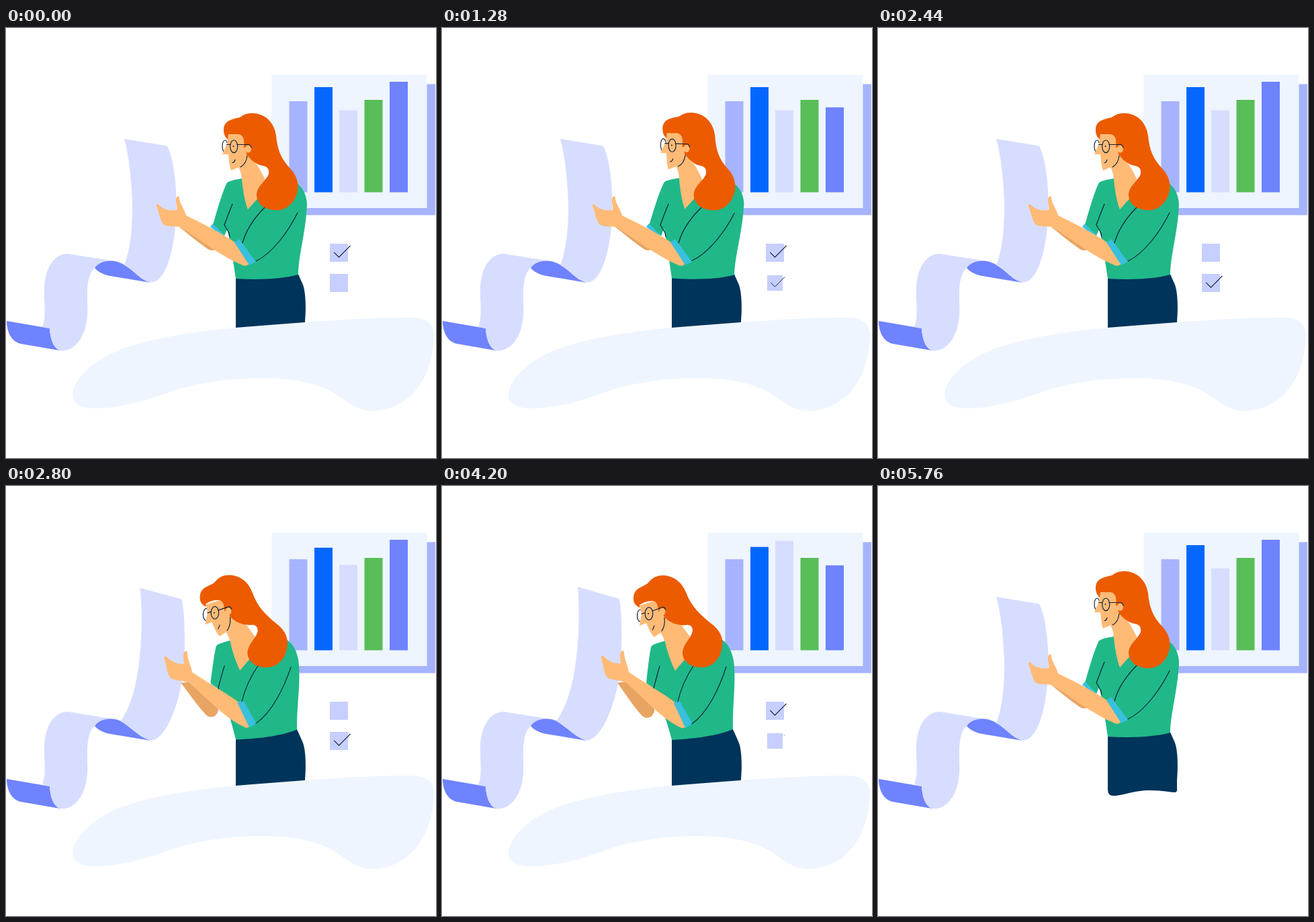
An HTML page for the animation above (5.8 s loop, 640x640 px).

```html
<!DOCTYPE html>
<html lang="en">
<head>
<meta charset="utf-8">
<title>Report review</title>
<style>
  html, body { margin: 0; width: 100%; height: 100%; overflow: hidden; background: #fff; }
  svg { display: block; width: 100%; height: 100%; }
  .line { fill: none; stroke: #0b1f3a; stroke-width: 1.15; stroke-linecap: round; stroke-linejoin: round; }
  .tick { fill: none; stroke: #0b1f3a; stroke-width: 1.1; }
</style>
</head>
<body>
<svg viewBox="0 0 640 640">
  <path fill="#a6b4ff" d="M409 83.5H639V278.5H409Z"/>
  <path fill="#eef5fe" d="M395.5 69.5H626.5V268H395.5Z"/>
  <g id="bars"></g>
  <g id="boxes"></g>
  <path fill="#6f83ff" d="M1 436L65 447C66 465 72 479 83 480.5L22 470C8 467 1 452 1 436Z"/>
  <path fill="#d7ddff" d="M54 445C60 430 57 415 57 395C56 360 70 336 92 336L158 346.5C145 347 137 351 132 357C120 368 121 390 121 410C124 450 108 480 83 480.5C72 479 66 465 65 447Z"/>
  <path fill="#6f83ff" d="M132 357C137 350 146 346.5 155 346.5C180 346 195 372 215 379L155 369C145 367 137 363 132 357Z"/>
  <path fill="#00345b" d="M342 370V452Q342 461 350 461C365 461 380 453 405 453C425 453 435 456 441 456Q446 456 445 450V438C447 415 446 390 441 380L433 362Z"/>
  <g id="person"></g>
  <path id="ground" fill="#eef5fe" d="M99 545C101 520 135 486 200 469C240 458 290 451 342 446C375 443 410 441 445 438C500 434 550 431 600 431C625 430 637 440 637 457C636 510 610 566 548 570C510 570 505 545 460 531C400 513 300 521 240 543C190 562 150 567 128 566C108 565 98 557 99 545Z"/>
</svg>
<script>
const LOOP = 5800, STEP = 40;
const $ = id => document.getElementById(id);

function add(parent, tag, attrs) {
  const el = document.createElementNS('http://www.w3.org/2000/svg', tag);
  for (const k in attrs) el.setAttribute(k, attrs[k]);
  return parent.appendChild(el);
}

const ramp = (t, a, b) => Math.min(1, Math.max(0, (t - a) / (b - a)));
const sine = (t, a, b) => (1 - Math.cos(Math.PI * ramp(t, a, b))) / 2;
const cubic = (t, a, b) => {
  const x = ramp(t, a, b);
  return x < .5 ? 4 * x ** 3 : 1 - 4 * (1 - x) ** 3;
};
// rises over a..b, falls back over c..d
const swing = (t, a, b, c, d) => sine(t, a, b) - sine(t, c, d);
const pulse = (t, a, b) => Math.sin(Math.PI * ramp(t, a, b));

const oval = (x, y, rx, ry) =>
  `M${x + rx} ${y}a${rx} ${ry} 0 1 0 ${-2 * rx} 0a${rx} ${ry} 0 1 0 ${2 * rx} 0Z`;

// Path between an upright and a leaning shape
function mix(a, b, p) {
  const nums = b.match(/-?[\d.]+/g);
  let i = 0;
  return a.replace(/-?[\d.]+/g, n => +(+n + (nums[i++] - n) * p).toFixed(2));
}

const SKIN = '#ffbb76', SHIRT = '#20b888', CUFF = '#39c0dd', HAIR = '#ec5b00';

// [paint, upright, leaning, held]: held parts do not follow the backward sway
const parts = [
  ['#d7ddff',
    'M176 165L240 175.5C252 200 255 250 253 280C250 340 235 380 215 378.5C200 376 190 360 176 353C187 325 188 290 188 265C187 225 183 190 176 165Z',
    'M202 150L264 168C269 200 268 250 264 282C258 325 238 378 215 378.5C200 376 185 358 170 350C188 325 196 290 200 255C204 220 205 185 202 150Z', 1],
  [SHIRT,
    'M351 224C340 226 329 228 328 232C320 250 313 275 308 293L325 309L329 300L333 315C337 340 340 360 342 373C375 375 410 374 435 367C435 340 447 300 448 262C447 245 440 237 434 232L395 227L351 224Z',
    'M333 230C325 233 312 235 311 240C308 255 306 275 304 293L316 302L318 310L333 347C337 360 340 370 342 378C375 376 410 372 433 362C432 330 437 300 435 270C434 250 427 235 417 229L378 230L333 230Z'],
  [CUFF, 'M308 291L304 296L321 309L326 309Z', 'M305 294L306 298L312 303L316 303Z', 1],
  ['#e8a463',
    'M254 293C270 306 285 318 299 328C304 332 311 332 314 327L305 318L280 296Z',
    'M261 293C275 312 285 328 296 340C302 348 313 347 316 335L316 320L280 290Z', 1],
  [SKIN,
    'M268 279C295 292 320 305 341 319L362 350C358 356 353 354 350 352C320 340 290 315 258 296C250 295 238 296 234 292C229 285 228 275 224 265C224 260 227 262 229 265C236 271 245 272 254 271C255 265 252 258 253 254C255 249 258 249 258 254C259 262 266 270 268 279Z',
    'M278 277C300 292 325 306 347 322L363 358C360 361 357 361 354 359C325 345 300 315 272 291C264 290 250 288 246 285C240 278 240 265 237 256C236 251 240 252 242 255C250 262 258 265 266 264C266 260 264 253 266 248C269 243 271 244 271 249C272 260 277 268 278 277Z', 1],
  [CUFF, 'M347 314L340 319L362 353L372 348Z', 'M353 319L345 323L362 360L373 354Z', 1],
  ['line', 'M337 262C332 274 328 285 325 293L332 305L333 311', 'M324 268C321 278 318 290 315 301L315 301L315 301', 1],
  [SKIN,
    'M345 205C349 212 351 220 351 226C353 245 356 260 360 270L387 240L385 224C381 217 378 210 374 204L358 188Z',
    'M324 216C328 222 331 228 332 232C336 250 342 265 347 275L375 242L372 228C366 220 361 213 357 208L332 194Z'],
  ['line', 'M386 266C372 280 358 298 352 320', 'M375 266C364 283 355 302 351 321'],
  ['line', 'M434 275C420 303 397 335 372 347', 'M423 269C413 300 396 337 372 354'],
  ['lens', oval(326, 176, 4, 9), oval(295, 193, 4.5, 9)],
  [SKIN,
    'M331 158L354 158L362 185C358 195 352 205 347 207L335 212C332 205 332 195 331 188L322 188L329 172Z',
    'M294 178L318 170L332 190C333 202 331 212 326 218L316 225C311 220 308 213 304 204L294 208L297 190Z'],
  [HAIR,
    'M330 166C326 162 324 158 324 152C324 138 335 136 348 133C355 128 361 126 370 127C390 129 400 145 402 160C404 182 410 195 422 208C432 218 436 230 434 242C430 262 415 273 400 271C382 270 373 260 373 248C374 234 388 227 391 217C392 209 388 206 382 205C373 204 364 196 358 188L357 178L354 178C356 164 352 158 345 158C340 158 335 158 331 158Z',
    'M294 181C288 178 285 174 285 168C285 152 296 152 306 145C312 137 319 133 329 133C348 134 358 146 363 158C371 180 385 192 401 205C413 214 419 225 417 238C415 258 402 270 386 270C368 270 358 260 358 248C359 234 372 226 373 215C373 208 368 206 363 207C350 208 338 203 331 195L326 186L322 187C322 175 318 171 313 171C306 171 300 173 294 177Z'],
  [SKIN, oval(360.5, 180, 4.5, 5.8), oval(328, 187, 4.5, 5.8)],
  ['line', 'M359 190C358 198 355 204 349 207', 'M331 196C332 204 331 210 327 216'],
  ['line', oval(339.2, 176.3, 5.5, 9.3), oval(308, 190, 5.8, 9.3)],
  ['line', 'M328.5 173.5L334 173.5', 'M297 190.5L302.5 188.5'],
  ['line', 'M344 173.5L361 173.5Q364 174 365 178', 'M313 186L328 180.5Q331 180 333 184'],
  ['#0b1f3a', oval(338.5, 176, 1, 1), oval(307, 190, 1, 1)],
  ['line', 'M337 200.5Q340 200 341 196', 'M313.5 214Q314.5 211 316 208']
].map(([paint, a, b, held]) => {
  const attrs = paint === 'line' ? { class: 'line' }
    : paint === 'lens' ? { class: 'line', style: 'fill:#fff' } : { fill: paint };
  return { el: add($('person'), 'path', attrs), a, b, held };
});

const bars = [
  [421.5, '#a6b4ff'], [459, '#0467fd'], [496, '#d7ddfe'], [533.5, '#59be57'], [571, '#6f83ff']
].map(([x, fill]) => add($('bars'), 'rect', { x, width: 27, fill }));

const boxes = [334.5, 379.5].map(y => {
  const g = add($('boxes'), 'g', {});
  add(g, 'path', { d: 'M-13.5-13.5h27v27h-27Z', fill: '#c7cfff' });
  const tick = add(g, 'path', { class: 'tick', d: 'M-7.2-.6L0 6.6L17-10.5', pathLength: 1 });
  return { g, tick, y };
});

function setBox({ g, tick, y }, shrink, from, to) {
  g.setAttribute('transform', `translate(495.5 ${y}) scale(${1 - .14 * shrink})`);
  tick.setAttribute('visibility', to > from ? 'visible' : 'hidden');
  tick.setAttribute('stroke-dasharray', `0 ${from} ${to - from} 2`);
}

function draw(t) {
  const lean = cubic(t, 2400, 2960) - cubic(t, 4840, 5410);
  const sway = lean - .11 * swing(t, 0, 960, 1260, 1880);
  for (const { el, a, b, held } of parts) el.setAttribute('d', mix(a, b, held ? lean : sway));

  const tops = [
    109,
    88 + 24 * swing(t, 2560, 3480, 3480, 4400),
    122.5 - 41 * swing(t, 2520, 3720, 4280, 5480),
    107,
    80 + 38.2 * (swing(t, 0, 800, 1260, 1880) + swing(t, 3040, 4240, 4280, 5480))
  ];
  bars.forEach((bar, i) => {
    bar.setAttribute('y', tops[i]);
    bar.setAttribute('height', 244.5 - tops[i]);
  });

  const redrawn = t >= 3000;
  setBox(boxes[0], pulse(t, 1320, 1880) + pulse(t, 3000, 3560),
    redrawn ? 0 : sine(t, 1320, 1720), redrawn ? sine(t, 3000, 3440) : 1);
  setBox(boxes[1], pulse(t, 960, 1560) + pulse(t, 3920, 4480),
    sine(t, 3800, 4260), sine(t, 860, 1260));

  // the ground and the checklist drop out just before the loop restarts
  const shown = t < 5760 ? 'inline' : 'none';
  $('ground').style.display = $('boxes').style.display = shown;
}

function tick(now) {
  draw(Math.floor(now % LOOP / STEP) * STEP);
  requestAnimationFrame(tick);
}
draw(0);
requestAnimationFrame(tick);
</script>
</body>
</html>
```
